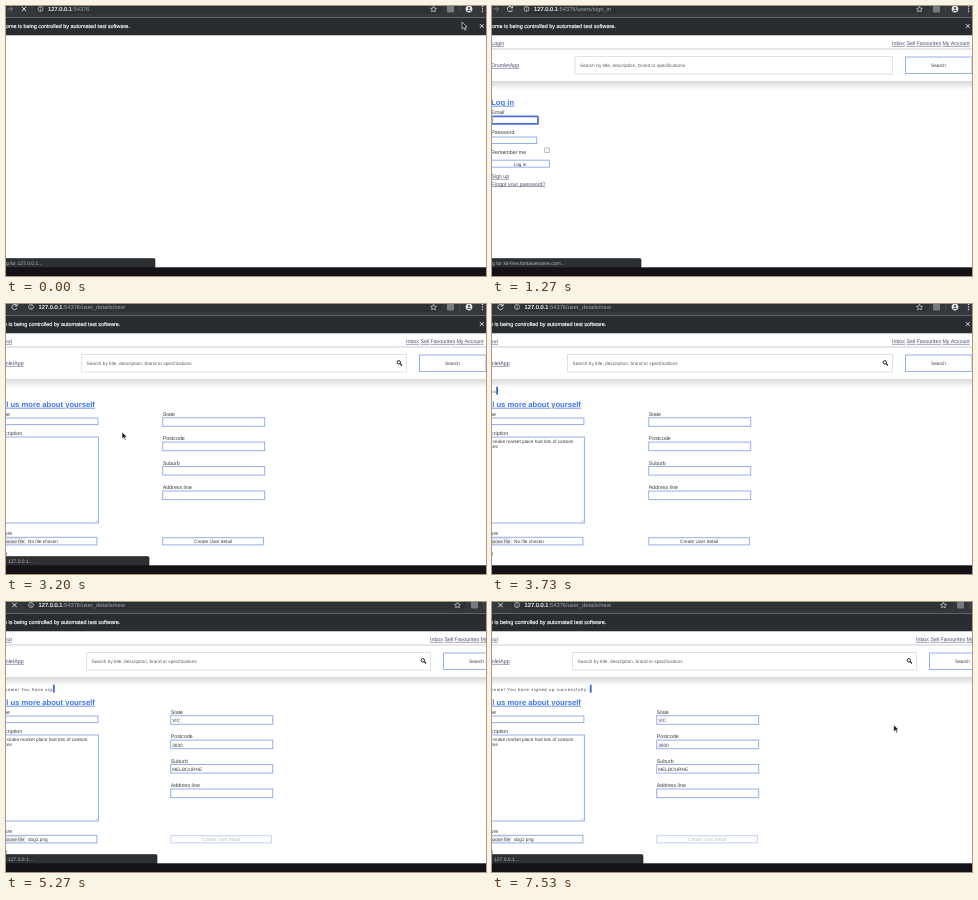
Recreate the animation shown at these times as an HTML page. Size 480x270 px, loop 8000 ms.

```html
<!DOCTYPE html>
<html lang="en">
<head>
<meta charset="utf-8">
<title>Sign-up browser test</title>
<style>
html, body { margin: 0; width: 100%; height: 100%; overflow: hidden; background: #fff; }
svg { display: block; width: 480px; height: 270px; }
text { font-family: "Liberation Sans", Arial, sans-serif; white-space: pre; text-rendering: geometricPrecision; }
.link { text-decoration: underline; }
.strong { stroke: #f4f5f6; stroke-width: .18px; }
</style>
</head>
<body>
<svg id="stage" viewBox="0 0 480 270"></svg>
<script>
const LOOP = 8000;
const INK = '#3a3c42', LINK = '#4a4f70', BLUE = '#94aeee', HEAD = '#3f74ea';
const SMALL = 4.74, BODY = 5.3, LEFT = -0.8;
const stage = document.getElementById('stage');

// y is the vertical middle of the line
const text = (x, y, str, size = BODY, fill = INK, extra = '') =>
  `<text x="${x}" y="${y + size * .36}" font-size="${size}" fill="${fill}" ${extra}>${str}</text>`;
const link = (x, y, str) => text(x, y, str, BODY, LINK, 'class="link"');
const centered = (x, y, str, fill) => text(x, y, str, SMALL, fill, 'text-anchor="middle"');
const title = (x, y, str) => text(x, y, str, 7.65, HEAD, 'class="link" font-weight="bold"');
const rect = (x, y, w, h, fill, extra = '') =>
  `<rect x="${x}" y="${y}" width="${w}" height="${h}" fill="${fill}" ${extra}/>`;
const path = (d, stroke, width = 1, fill = 'none') =>
  `<path d="${d}" stroke="${stroke}" stroke-width="${width}" fill="${fill}"/>`;
const box = (x, y, w, h, stroke = BLUE) =>
  rect(x, y, w, h, '#fff', `stroke="${stroke}" stroke-width="1"`);
const focusBox = (x, y, w, h) =>
  rect(x, y, w, h, '#fff', 'stroke="#4872d8" stroke-width="1.8" rx=".6"');
const field = (x, y, w, h, value = '', focused = false) =>
  (focused ? focusBox(x, y, w, h) : box(x, y, w, h)) + text(x + 1.5, y + h / 2 + .5, value, SMALL);
const cross = (x, y, r) =>
  path(`M${x - r} ${y - r}l${2 * r} ${2 * r}m0 ${-2 * r}l${-2 * r} ${2 * r}`, '#eceef0', .9);
const pointer = (x, y) =>
  path(`M${x} ${y}v7l1.7-1.5 1.2 2.6 1.2-.5-1.2-2.6h2.2z`, '#fff', .6, '#16181b');

function toolbar(l, r, url, loading) {
  const x = l + 18;
  const reload = path(`M${x + 2.2} 1.6A2.6 2.6 0 1 0 ${x + 2.5} 3.8M${x + 2.6} -.4v2.3h-2.3`, '#e4e6e8', .9);
  return rect(0, 0, 480, 11.5, '#34383b') +
    rect(l + 28, -8, 409 + r - l, 16, '#2e3235', 'rx="8"') +
    path(`M${l + 1.5} 3h5m-2.3-2.4l2.4 2.4-2.4 2.4`, '#85898d', .8) +
    (loading ? cross(x, 3, 2.2) : reload) +
    `<circle cx="${l + 34.5}" cy="3" r="2.5" fill="none" stroke="#d0d3d6" stroke-width=".7"/>` +
    path(`M${l + 34.5} 1.3v.7m0 .7v2`, '#d0d3d6', .7) +
    text(l + 42, 3, `<tspan class="strong" fill="#f4f5f6">127.0.0.1</tspan>:54376${url}`, 5.75, '#a0a4a8') +
    path(`M${r + 427.5} .2l.9 2 2.1.2-1.6 1.4.5 2.1-1.9-1.1-1.9 1.1.5-2.1-1.6-1.4 2.1-.2z`, '#d5d7da', .7) +
    rect(r + 441, -.5, 7, 7, '#777b80', 'rx="1"') +
    rect(r + 453.5, 0, .6, 7, '#55595d') +
    `<circle cx="${r + 463}" cy="3" r="3.4" fill="#e4e6e8"/><circle cx="${r + 463}" cy="2" r="1.1" fill="#35383b"/>` +
    path(`M${r + 461} 5q2-2 4 0`, '#35383b', 1) +
    [.5, 3, 5.5].map(y => `<circle cx="${r + 476.5}" cy="${y}" r=".7" fill="#e4e6e8"/>`).join('') +
    rect(0, 11.5, 480, 17.5, '#292d30') +
    text(l, 20, 'ome is being controlled by automated test software.', 5.43, '#f4f5f6', 'class="strong"') +
    cross(r + 475.8, 20, 1.9);
}

function siteHeader(l, r, account, inputX, icon) {
  const nav = [[400, 'Inbox'], [414.5, 'Sell'], [424.4, 'Favourites'], [450.4, 'My Account']];
  return link(l + LEFT, 37, account) +
    nav.map(([x, s]) => link(x + r, 37, s)).join('') +
    rect(0, 42.4, 480, 1.2, '#d3d6e0') +
    rect(0, 75, 480, 9, 'url(#shade)') +
    link(l + LEFT, 59, 'DrumletApp') +
    box(inputX, 50.5, 400.5 + r - inputX, 17.5, '#dde2ec') +
    text(inputX + 5, 59, 'Search by title, description, brand or specifications', SMALL, '#5c5f66') +
    (icon ? `<circle cx="${r + 392.8}" cy="58.3" r="1.7" fill="none" stroke="#22252b" stroke-width="1"/>` +
      path(`M${r + 394} 59.5l2 2`, '#22252b', 1.1) : '') +
    box(r + 413.5, 51, 66.5, 16.5) + centered(r + 446.5, 59, 'Search');
}

const signIn = () =>
  title(LEFT, 96, 'Log in') + text(LEFT, 106, 'Email') +
  focusBox(-1, 110.3, 47, 7.6) + rect(.6, 111.8, .5, 4.8, INK) +
  text(LEFT, 126.5, 'Password') + field(-1, 131, 45.7, 6.5) +
  text(LEFT, 146, 'Remember me') +
  rect(52.8, 142, 4.4, 4.4, '#fff', 'stroke="#888c94" stroke-width=".6"') +
  box(-1, 154.2, 58.4, 7) + centered(28, 157.8, 'Log in') +
  link(LEFT, 170, 'Sign up') + link(LEFT, 177.6, 'Forgot your password?');

function signUp(t) {
  const dots = y => Array.from({ length: 8 }, (_, i) =>
    `<circle cx="${1.5 + i * 1.95}" cy="${y}" r=".65" fill="${INK}"/>`).join('');
  const step = t < 2050 ? 0 : t < 2430 ? 1 : 2;
  return title(LEFT, 96, 'Sign up') + text(LEFT, 106, 'Email') +
    field(-1, 110.5, 45.7, 6.5, t > 1930 ? 'owl@pen.test' : '', step == 0) +
    text(LEFT, 125.5, 'Password') +
    text(LEFT, 133, '(6 characters minimum)', BODY, INK, 'font-style="italic"') +
    field(-1, 137, 47, 7.6, '', step == 1) + (t > 2200 ? dots(141) : '') +
    text(LEFT, 153.5, 'Password confirmation') +
    field(-1, 158, 45.7, 6.5, '', step == 2) + (t > 2500 ? dots(161.3) : '') +
    (step == 1 ? rect(t > 2200 ? 16.6 : .6, 138.6, .5, 4.8, INK) : '') +
    box(-1, 169.3, 58.4, 7) + centered(28, 173, 'Sign up') +
    link(LEFT, 185, 'Log in');
}

function notice(t) {
  const n = Math.max(0, Math.min(40, Math.floor((t - 3200) / 97)));
  const start = -9.8, end = start + n * 2.675;
  return `<clipPath id="typed"><rect x="-10" y="80" width="${end + 10}" height="14"/></clipPath>` +
    `<g clip-path="url(#typed)">` +
    text(start, 87, 'Welcome! You have signed up successfully.', 4.17, INK, 'letter-spacing=".15em"') +
    '</g>' + rect(end + .6, 82.8, 1.8, 7.8, '#3d66cf');
}

function details(t, colX) {
  const x = -10.3, sent = t > 4250;
  const rows = [['State', 113.7, 'VIC', 3750], ['Postcode', 138.1, '3000', 3900],
    ['Suburb', 162.5, 'MELBOURNE', 4030], ['Address line', 187, '', 0]];
  return notice(t) + title(x, 100, 'Tell us more about yourself') +
    text(x, 110, 'Name') + box(x, 114, 102.2, 6.6) +
    text(x, 129, 'Description') + box(x, 133, 102.7, 86) +
    path('M89.4 218l2-2m-.7 2l.7-.7', '#888', .4) +
    (t > 3550 ? text(-9, 137, 'The snake market place had lots of cartoon', SMALL) +
      text(-9, 142.6, 'snakes', SMALL) : '') +
    text(x, 229, 'Picture') + box(x, 233.3, 101.2, 7.6) +
    rect(-8, 234.4, 27.2, 5.4, '#f6f6f8', 'stroke="#b8bcc6" stroke-width=".4" rx=".8"') +
    text(-5.5, 237, 'Choose file', SMALL) +
    text(22, 237, t > 4130 ? 'dog1.png' : 'No file chosen', SMALL) +
    text(-.4, 249, ')', SMALL) +
    rows.map(([label, y, value, at]) =>
      text(colX, y - 3.7, label) + field(colX, y, 102, 8.6, t > at ? value : '')).join('') +
    box(colX, 233.7, 100.7, 7.2, sent ? '#c3d1f4' : BLUE) +
    centered(colX + 50.4, 237.3, 'Create User detail', sent ? '#bcbec3' : INK);
}

const status = (l, width, host) =>
  rect(-2, 252.6, width + 2, 9.6, '#2d3033', 'rx="1.2" stroke="#17191b" stroke-width=".6"') +
  text(l, 257.2, `g for ${host}...`, 5, '#b4b8bc');

function mouse(t) {
  if (t < 100) return pointer(456, 16);
  if (t > 2870 && t < 3450) return pointer(116, 128);
  if (t < 5900) return '';
  const k = Math.min(1, (t - 5900) / 370), ease = 1 - (1 - k) ** 2;
  const nudge = Math.min(1, Math.max(0, (t - 6670) / 300));
  return pointer(442 - 39 * ease - 1.3 * nudge, 116 + 6 * ease + nudge * .8);
}

function scene(t) {
  const home = t < 400, detail = t >= 2800, wide = t >= 4730;
  const l = detail ? -9.5 : 0, r = wide ? 24 : 0;
  const signing = t >= 1600;
  const url = home ? '' : detail ? '/user_details/new' : signing ? '/users/sign_up' : '/users/sign_in';
  const loading = home || (t > 2620 && !detail) || t > 4250;
  let page = '';
  if (!home) {
    page = siteHeader(l, r, detail ? 'Logout' : 'Login', wide ? 80.5 : detail ? 75.5 : 83, t > 1750) +
      (detail ? details(t, wide ? 164.7 : 156.7) : signing ? signUp(t) : signIn());
  }
  let bar = '';
  if (t < 130) bar = status(l, 149, '127.0.0.1');
  else if (t > 600 && t < 1750) bar = status(l, 149, 'kit-free.fontawesome.com');
  else if (t > 2800 && t < 3500) bar = status(l, 143, '127.0.0.1');
  else if (wide) bar = status(l, 151, '127.0.0.1');
  return '<defs><linearGradient id="shade" x2="0" y2="1">' +
    '<stop stop-color="#000" stop-opacity=".15"/><stop offset="1" stop-color="#000" stop-opacity="0"/>' +
    '</linearGradient></defs>' +
    rect(0, 0, 480, 270, '#fff') + rect(0, 29, 480, 1, '#c4c7c9') +
    page + toolbar(l, r, url, loading) + bar +
    rect(0, 261.3, 480, 8.7, '#141216') + mouse(t);
}

let shown = '';
function draw(now) {
  const next = scene(now % LOOP);
  if (next !== shown) stage.innerHTML = shown = next;
  requestAnimationFrame(draw);
}
draw(performance.now());
</script>
</body>
</html>
```
